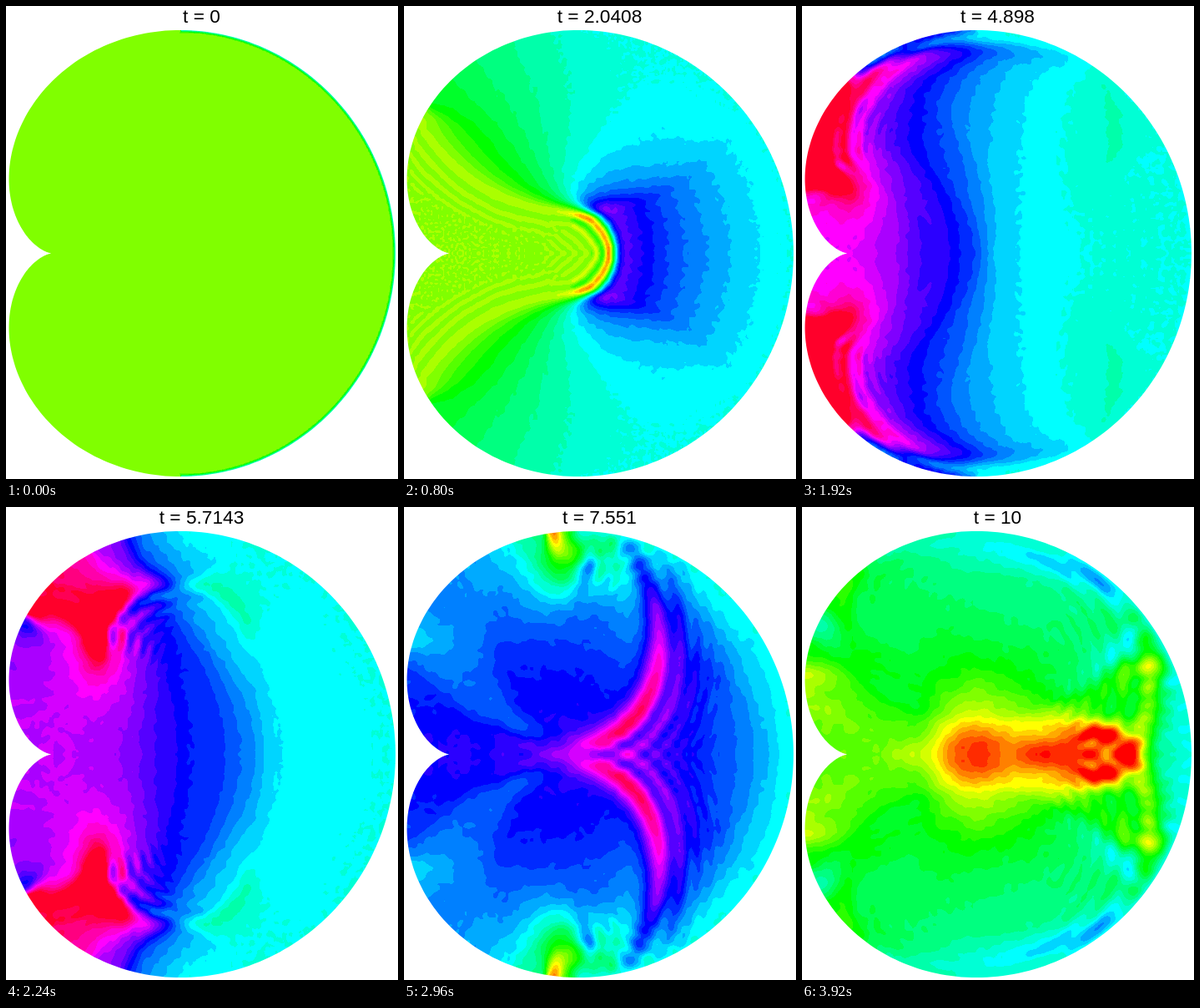
An HTML page with a canvas that plays this animation: 470x567 px, repeating every 4000 ms.

```html
<!DOCTYPE html>
<html>
<head>
<meta charset="utf-8">
<title>Waves in a cardioid</title>
<style>
  html, body { margin: 0; width: 100%; height: 100%; overflow: hidden; background: #fff; }
  canvas { display: block; }
</style>
</head>
<body>
<canvas id="stage" width="470" height="567"></canvas>
<script>
// Wave equation in r < 2(1 + cos phi): u = 1 on the arc |phi| < 60 deg,
// free elsewhere, starting at rest from u = 0. The field stored is w = u - 1,
// on the upper half only, since the solution is symmetric about the x axis.
const WIDTH = 470, HEIGHT = 567, SCALE = 103, CUSP_X = 55, CUSP_Y = 296.5;
const FRAMES = 50, FRAME_MS = 80, T_END = 10;
const D = 0.02, COLS = 234, ROWS = 138, X_MIN = -0.55;
const STEPS = 40, DT = T_END / (FRAMES - 1) / STEPS;
const MESH = 0.035, DISPERSION = MESH * MESH / 24 + D * D / 12, DAMPING = 5e-5;

const ctx = document.getElementById('stage').getContext('2d');
const field = () => new Float32Array(COLS * ROWS);
const w = field(), speed = field(), lapW = field(), mixed = field(), accel = field();
const diag = field(), dispersion = field(), inside = field();
const cells = [], ghosts = [];

let seed = 7;
const random = () => (seed = (seed * 16807) % 2147483647) / 2147483647;

const xOf = n => X_MIN + (n % COLS) * D;
const yOf = n => (Math.floor(n / COLS) - 0.5) * D;
const isFixedSide = n => yOf(n) < xOf(n) * Math.sqrt(3);
function level(n) {
  const x = xOf(n), r = Math.hypot(x, yOf(n));
  return 2 * (1 + x / r) - r;
}

function buildGrid() {
  for (let n = COLS; n < COLS * (ROWS - 1); n++) {
    if (level(n) > 0) { inside[n] = 1; cells.push(n); }
  }
  for (const n of cells) {
    const f = level(n), x = xOf(n), y = yOf(n), r = Math.hypot(x, y);
    for (const m of [n - 1, n + 1, n - COLS, n + COLS]) {
      if (m < COLS) continue;
      if (inside[m]) diag[n] += 1;
      else if (isFixedSide(m)) diag[n] += 1 / Math.max(0.5, f / (f - level(m)));
    }
    // Uneven dispersion scatters short waves as an irregular mesh would.
    dispersion[n] = DISPERSION * 2 * random();
    const distance = f / Math.hypot(1, 2 * y / (r * r));
    w[n] = isFixedSide(n) ? -Math.min(1, distance / MESH) : -1;
  }
  // Cells just outside the free wall take the mean of their inner neighbours.
  for (let n = COLS + 1; n < COLS * (ROWS - 1) - 1; n++) {
    if (inside[n] || isFixedSide(n)) continue;
    const near = [];
    for (const row of [-COLS, 0, COLS])
      for (const col of [-1, 0, 1])
        if (inside[n + row + col]) near.push(n + row + col);
    if (near.length) ghosts.push([n, near]);
  }
}

function laplacian(v, out) {
  for (let k = 0; k < cells.length; k++) {
    const n = cells[k];
    out[n] = (v[n - 1] + v[n + 1] + v[n - COLS] + v[n + COLS] - diag[n] * v[n]) / (D * D);
  }
}

function step() {
  laplacian(w, lapW);
  for (const n of cells) mixed[n] = w[n] - dispersion[n] * lapW[n] + DAMPING * speed[n];
  laplacian(mixed, accel);
  for (const n of cells) {
    speed[n] += DT * accel[n];
    w[n] += DT * speed[n];
  }
}

const snapshots = [];
function snapshot(index) {
  while (snapshots.length <= index) {
    if (snapshots.length) for (let k = 0; k < STEPS; k++) step();
    const copy = w.slice();
    for (const [n, near] of ghosts)
      copy[n] = near.reduce((sum, m) => sum + w[m], 0) / near.length;
    copy.copyWithin(0, COLS, 2 * COLS);
    snapshots.push(copy);
  }
  return snapshots[index];
}

// 36 hues spread over u = -1 .. 3
const palette = Uint32Array.from({ length: 36 }, (_, k) => {
  const channel = shift =>
    Math.round(255 * Math.min(1, Math.max(0, Math.abs((k / 6 + shift) % 6 - 3) - 1)));
  return (255 << 24 | channel(2) << 16 | channel(4) << 8 | channel(0)) >>> 0;
});

const image = ctx.createImageData(WIDTH, HEIGHT);
const pixels = new Uint32Array(image.data.buffer);

function paintField(v) {
  for (let py = 28; py < 566; py++) {
    const gy = Math.abs(py + 0.5 - CUSP_Y) / SCALE / D + 0.5;
    const row = Math.floor(gy), fy = gy - row;
    for (let px = 2; px < 469; px++) {
      const gx = ((px + 0.5 - CUSP_X) / SCALE - X_MIN) / D;
      const col = Math.floor(gx), fx = gx - col, n = row * COLS + col;
      const low = v[n] + (v[n + 1] - v[n]) * fx;
      const high = v[n + COLS] + (v[n + COLS + 1] - v[n + COLS]) * fx;
      const band = Math.floor((low + (high - low) * fy + 2) * 9 + 0.001);
      pixels[py * WIDTH + px] = palette[Math.max(0, Math.min(35, band))];
    }
  }
  ctx.putImageData(image, 0, 0);
}

const outsideShape = new Path2D();
outsideShape.rect(0, 0, WIDTH, HEIGHT);
for (let k = 0; k <= 360; k++) {
  const phi = (k - 180) * Math.PI / 180, r = 2 * (1 + Math.cos(phi)) * SCALE;
  outsideShape[k ? 'lineTo' : 'moveTo'](CUSP_X + r * Math.cos(phi), CUSP_Y + r * Math.sin(phi));
}
outsideShape.closePath();

let shown = -1;
function draw() {
  const index = Math.floor(performance.now() / FRAME_MS) % FRAMES;
  if (index !== shown) {
    shown = index;
    paintField(snapshot(index));
    ctx.fillStyle = '#fff';
    ctx.fill(outsideShape, 'evenodd');
    ctx.fillStyle = '#000';
    ctx.font = '22.7px "Liberation Sans", Arial, sans-serif';
    ctx.textAlign = 'center';
    ctx.fillText('t = ' + +(T_END * index / (FRAMES - 1)).toFixed(4), 234.5, 20);
  }
  requestAnimationFrame(draw);
}

buildGrid();
draw();
</script>
</body>
</html>
```
